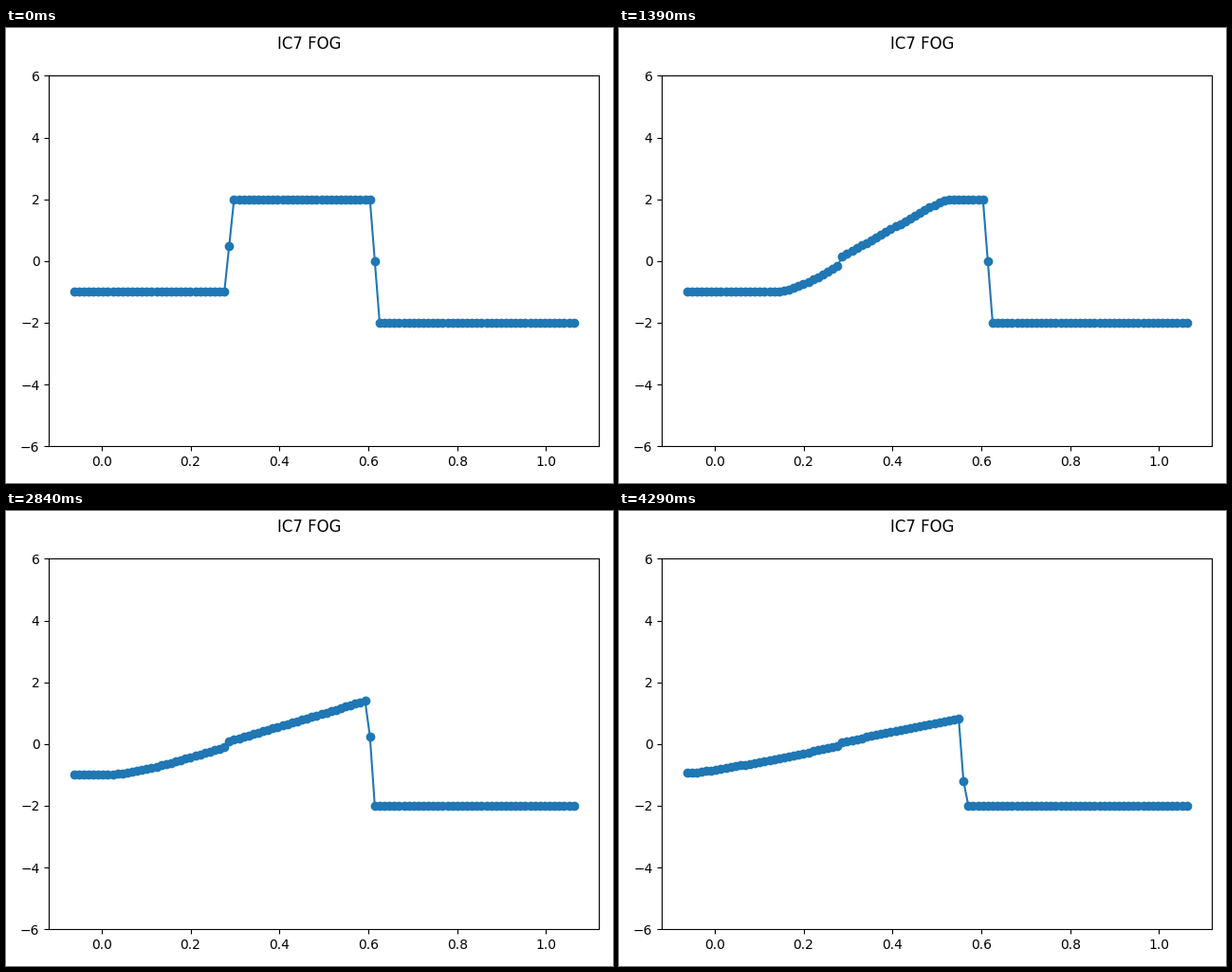
Recreate the animation shown at these times as a matplotlib script. Size 640x480 px, loop 4.36 s.

```python
import numpy as np
import matplotlib.pyplot as plt
from matplotlib.animation import FuncAnimation

CELLS, GHOSTS = 100, 2
CFL = 0.9
STEPS, STEP_MS = 66, 66
LOOP_MS, TICK_MS = 4360, 20

x = np.linspace(-1 / 16, 17 / 16, CELLS + 2 * GHOSTS)


def initial_state():
    """Three plateaus with averaged values at the two jumps."""
    first, second = GHOSTS + 30, GHOSTS + 60
    u = np.full(x.size, 2.0)
    u[:first], u[first] = -1.0, 0.5
    u[second], u[second + 1:] = 0.0, -2.0
    return u


def godunov_flux(left, right):
    """Exact Riemann flux for Burgers' equation."""
    return np.maximum(np.maximum(left, 0) ** 2, np.minimum(right, 0) ** 2) / 2


def advance(u):
    ratio = CFL / np.abs(u).max()
    flux = godunov_flux(u[:-1], u[1:])
    new = u.copy()
    new[1:-1] -= ratio * np.diff(flux)
    new[:GHOSTS] = new[GHOSTS]
    new[-GHOSTS:] = new[-GHOSTS - 1]
    return new


states = [initial_state()]
while len(states) < STEPS:
    states.append(advance(states[-1]))

fig, ax = plt.subplots(figsize=(6.4, 4.8), dpi=100)
fig.suptitle("IC7 FOG", y=0.9842)
line, = ax.plot(x, states[0], "o-")
ax.set_ylim(-6, 6)
fig.tight_layout()
fig.subplots_adjust(top=0.895)


def update(i):
    # Steps start on a 10 ms clock, so round to the nearest one.
    line.set_ydata(states[(i * TICK_MS + 15) // STEP_MS])
    return line,


anim = FuncAnimation(fig, update, frames=LOOP_MS // TICK_MS, interval=TICK_MS,
                     repeat=True, repeat_delay=0)
plt.show()
```
